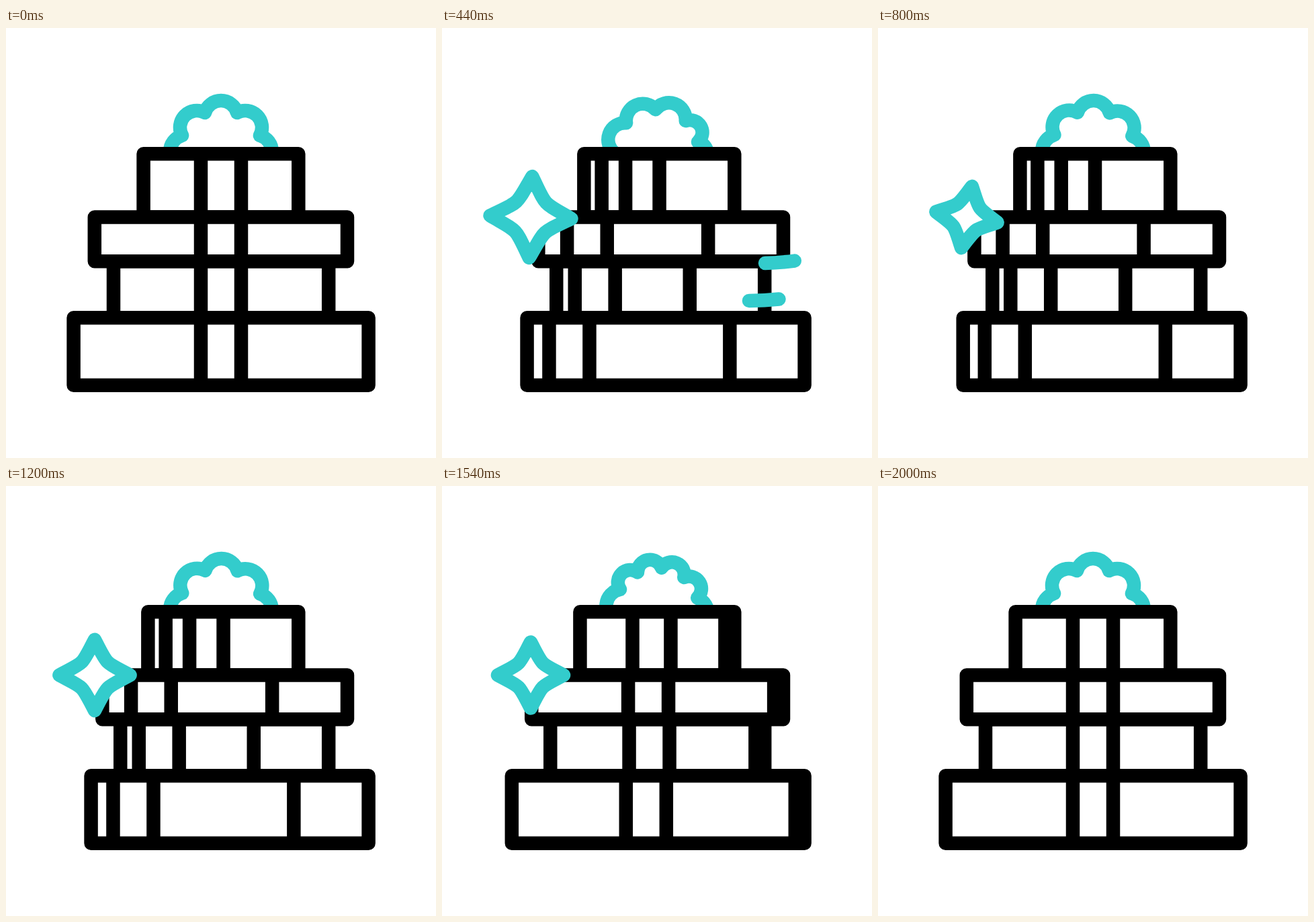
Write an HTML page that moves like this. It is 640 by 640 pixels and loops after 2.2 s.

```html
<!DOCTYPE html>
<html lang="en">
<head>
<meta charset="utf-8">
<title>Gift boxes</title>
<style>
  html, body { margin: 0; width: 100%; height: 100%; overflow: hidden; background: #fff; }
  svg { display: block; width: 100vw; height: 100vh; }
  path { stroke-width: 20.5; stroke-linecap: round; stroke-linejoin: round; }
  .box { fill: #fff; stroke: #000; }
  .accent { fill: none; stroke: #33cccc; }
  #star { fill: #fff; }
</style>
</head>
<body>
<svg viewBox="0 0 640 640">
  <path id="bow" class="accent"/>
  <g id="boxes"></g>
  <path class="accent dash" pathLength="1" d="M597 330Q545 348 481 350"/>
  <path class="accent dash" pathLength="1" d="M575 389Q525 405 457 406"/>
  <path id="star" class="accent"/>
</svg>
<script>
const LOOP = 2200;
const BOW = { x: 320, y: 184, r: 62.7 };
const STAR = { x: 132, y: 281.5 };

// x pairs are [facing front, turned]
const BOXES = [
  { top: 347.2, bottom: 431.3, right: 480.2, left: [160, 170.3], ribbon: [[290, 197.3], [350, 257.2]], corner: 368.2 },
  { top: 431.3, bottom: 531.7, right: 539.6, left: [100.6, 126.7], ribbon: [[290, 158.8], [350, 218.8]], corner: 427.8 },
  { top: 187.2, bottom: 281.6, right: 435.3, left: [204.6, 211.4], ribbon: [[290, 237.4], [350, 272.7]], corner: 323 },
  { top: 281.6, bottom: 347.2, right: 508, left: [131.8, 143.4], ribbon: [[290, 185.6], [350, 245.2]], corner: 395.6 }
];

// [time, star radius]
const STAR_KEYS = [[0, 0], [440, 60.5], [860, 45.5], [1140, 54], [1400, 44], [1680, 54], [2000, 0]];

const bow = document.getElementById('bow');
const star = document.getElementById('star');
const dashes = document.querySelectorAll('.dash');

const lerp = (a, b, p) => a + (b - a) * p;

function ease(t, start, end) {
  const x = Math.min(1, Math.max(0, (t - start) / (end - start)));
  return x * x * (3 - 2 * x);
}

function keyed(t, keys) {
  let value = keys[0][1];
  for (let i = 1; i < keys.length; i++) {
    value += (keys[i][1] - keys[i - 1][1]) * ease(t, keys[i - 1][0], keys[i][0]);
  }
  return value;
}

// Five wide lobes on top, four narrow ones below.
function bowPath() {
  const point = deg => {
    const a = deg * Math.PI / 180;
    return `${BOW.x + BOW.r * Math.sin(a)} ${BOW.y - BOW.r * Math.cos(a)}`;
  };
  let angle = -112.5;
  let d = 'M' + point(angle);
  for (let i = 0; i < 9; i++) {
    const wide = i < 5;
    const radius = wide ? 25 : 18.5;
    angle += wide ? 45 : 33.75;
    d += `A${radius} ${radius} 0 0 1 ${point(angle)}`;
  }
  return d + 'Z';
}

function starPath(r) {
  const a = 0.4 * r, b = 0.25 * r;
  return `M0 ${-r}C${a} ${-b} ${b} ${-a} ${r} 0C${b} ${a} ${a} ${b} 0 ${r}` +
    `C${-a} ${b} ${-b} ${a} ${-r} 0C${-b} ${-a} ${-a} ${-b} 0 ${-r}Z`;
}

function boxPath(box, turn) {
  const left = lerp(...box.left, turn);
  const uprights = [...box.ribbon, [box.right, box.corner]]
    .map(pair => `M${lerp(...pair, turn)} ${box.top}V${box.bottom}`);
  return `M${left} ${box.top}H${box.right}V${box.bottom}H${left}Z` + uprights.join('');
}

const boxNodes = BOXES.map(() => {
  const node = document.createElementNS('http://www.w3.org/2000/svg', 'path');
  node.setAttribute('class', 'box');
  document.getElementById('boxes').append(node);
  return node;
});
bow.setAttribute('d', bowPath());

function draw(t) {
  const turn = ease(t, 0, 460) - ease(t, 1182, 1642);
  BOXES.forEach((box, i) => boxNodes[i].setAttribute('d', boxPath(box, turn)));

  const spin = 360 * (ease(t, 1186, 1880) - ease(t, 294, 816));
  bow.setAttribute('transform', `rotate(${spin} ${BOW.x} ${BOW.y})`);

  const head = ease(t, 120, 400);
  const tail = ease(t, 300, 540);
  dashes.forEach(dash => {
    dash.style.display = head - tail > 0.005 ? '' : 'none';
    dash.style.strokeDasharray = `${head - tail} 2`;
    dash.style.strokeDashoffset = -tail;
  });

  const radius = keyed(t, STAR_KEYS);
  star.style.display = radius > 0.5 ? '' : 'none';
  star.style.strokeWidth = 20.5 * Math.min(1, radius / 20);
  star.setAttribute('d', starPath(radius));
  star.setAttribute('transform', `translate(${STAR.x} ${STAR.y}) rotate(${-360 * ease(t, 0, 889)})`);
}

const begin = performance.now();
function tick() {
  draw((performance.now() - begin) % LOOP);
  requestAnimationFrame(tick);
}
draw(0);
requestAnimationFrame(tick);
</script>
</body>
</html>
```
